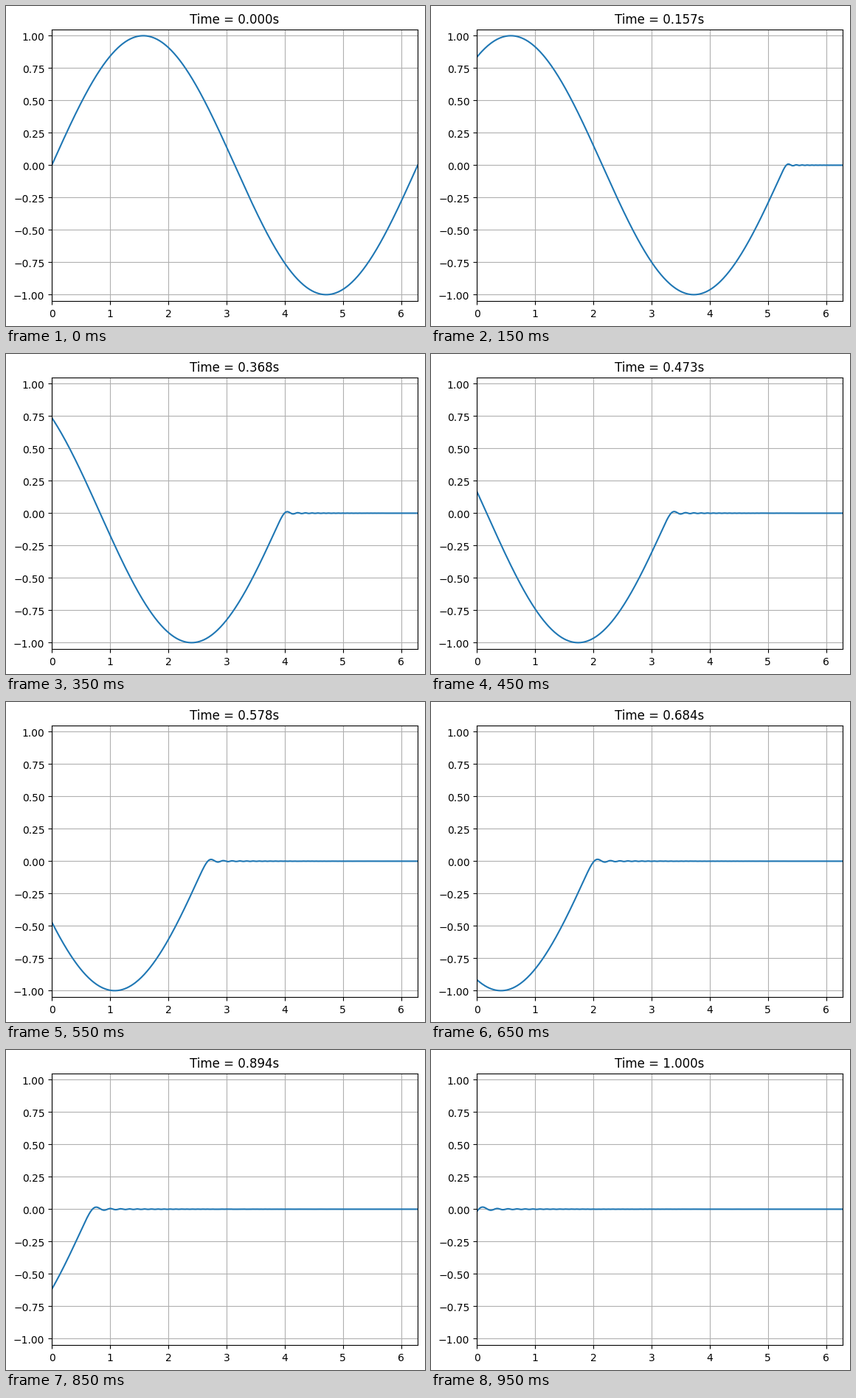
Recreate the animation shown at these times as a matplotlib script. Size 568 by 435 pixels, loop 1000 ms.

```python
import numpy as np
import matplotlib.pyplot as plt
from matplotlib.animation import FuncAnimation
from matplotlib.transforms import ScaledTranslation

WIDTH, HEIGHT, DPI = 568, 435, 100
FRAMES, INTERVAL = 20, 50
SPEED = 2 * np.pi
NODES, STEPS = 500, 1000
DT = 1 / STEPS
PIXEL_PT = 72 / DPI


def solve_advection(x):
    """Leapfrog solution of u_t = c u_x with zero inflow on the right."""
    courant = SPEED * DT / (x[1] - x[0])
    history = np.zeros((STEPS + 1, x.size))
    history[0] = np.sin(x)
    shifted = x + SPEED * DT
    history[1] = np.where(shifted < 2 * np.pi, np.sin(shifted), 0)
    for n in range(1, STEPS):
        u, following = history[n], history[n + 1]
        following[1:-1] = history[n - 1, 1:-1] + courant * (u[2:] - u[:-2])
        following[0] = u[0] + courant * (u[1] - u[0])
    return history


x = np.linspace(0, 2 * np.pi, NODES)
solution = solve_advection(x)

plt.rcParams["font.family"] = "DejaVu Sans"
# The tiny margin keeps the pixel size from being truncated downwards.
fig = plt.figure(figsize=(WIDTH / DPI + 1e-6, HEIGHT / DPI + 1e-6), dpi=DPI)
ax = fig.add_axes([62.1 / WIDTH, 33.8 / HEIGHT, 496 / WIDTH, 369.6 / HEIGHT])
ax.set_xlim(0, 2 * np.pi)
ax.set_ylim(-1.05, 1.05)
ax.grid(True)
line, = ax.plot(x, solution[0])

# All text sits one pixel lower than the default layout puts it.
title = ax.set_title("Time = 0.000s", pad=6 - PIXEL_PT)
pixel_down = ScaledTranslation(0, -1 / DPI, fig.dpi_scale_trans)
for label in ax.get_xticklabels() + ax.get_yticklabels():
    label.set_transform(label.get_transform() + pixel_down)


def update(frame):
    step = frame * STEPS // (FRAMES - 1)
    line.set_ydata(solution[step])
    title.set_text(f"Time = {step * DT:.3f}s")
    return line, title


animation = FuncAnimation(fig, update, frames=FRAMES, interval=INTERVAL,
                          repeat=True, blit=False)
plt.show()
```
